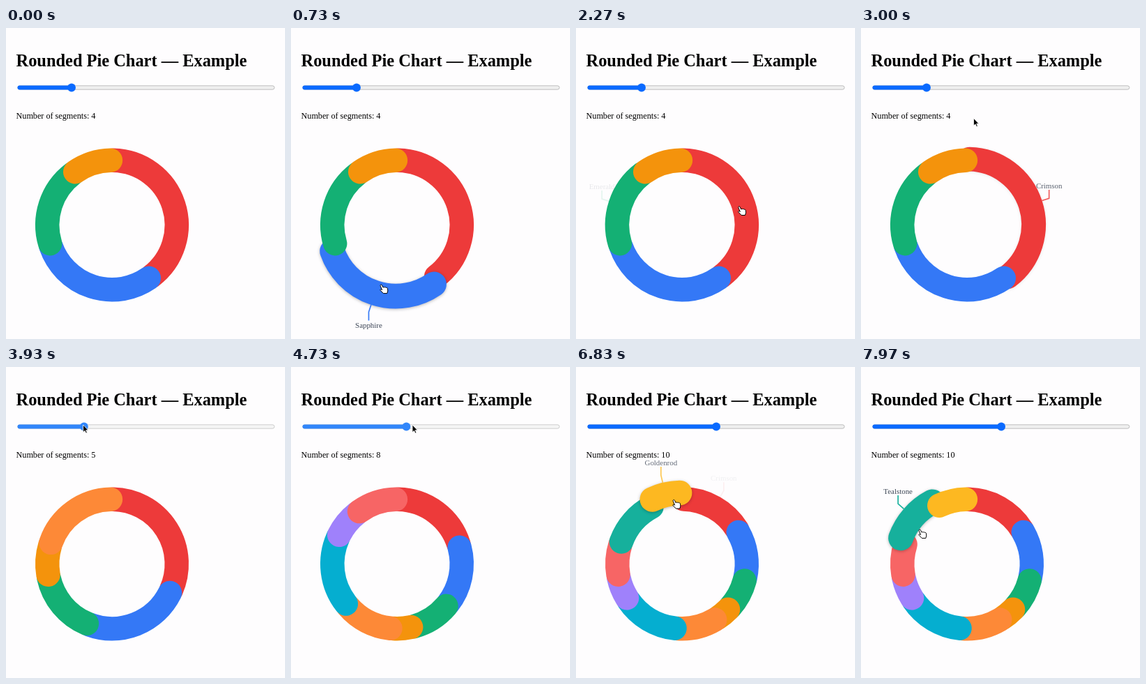
An HTML page for the animation above (8000 ms loop, 400 by 446 pixels).

```html
<!DOCTYPE html>
<html lang="en">
<head>
<meta charset="utf-8">
<title>Rounded Pie Chart</title>
<style>
  html, body { margin: 0; width: 100%; height: 100%; overflow: hidden; background: #fefdfe; }
  svg { display: block; width: 400px; height: 446px; font-family: "Liberation Serif", Times, serif; }
  #chart path { fill: none; stroke-width: 34.5; stroke-linecap: round; }
  #chart .label path { stroke-width: 1.7; stroke-linecap: butt; }
  .label { font-size: 10.9px; text-anchor: middle; fill: #374151; }
</style>
</head>
<body>
<svg viewBox="0 0 400 446">
  <text x="14.5" y="55" font-size="24.42" font-weight="bold">Rounded Pie Chart — Example</text>
  <g id="slider"></g>
  <text id="count" x="14.5" y="130" font-size="12.18"></text>
  <g id="chart"></g>
  <path id="cursor" stroke-linejoin="round"></path>
</svg>
<script>
const LOOP = 8000, STEP = 5;
const CX = 152, CY = 282.5, INNER = 75.5, OUTER = 110;
const MID = (INNER + OUTER) / 2;
const GAP = 1.3;                      // degrees trimmed from both ends of a segment
const GROW = 0.04, SHIFT = 6.1;       // how a hovered segment is lifted
const HOVER_LAG = 50, LIFT_TIME = 80, FADE_TIME = 350;
const DRAG_START = 3600, DRAG_END = 5250;

const segments = [
  [40, '#ed3a3a', 'Crimson'], [30, '#3478f6', 'Sapphire'],
  [20, '#14b074', 'Emerald'], [10, '#f4930c', 'Amber'],
  [25, '#fd8937', 'Tangerine'], [35, '#05aed0', 'Cyan'],
  [15, '#9f81fb', 'Violet'], [20, '#f76565', 'Coral'],
  [30, '#16b09c', 'Tealstone'], [18, '#fdb821', 'Goldenrod']
];

// Stops of the pointer: time, x, y
const stops = [
  [30, 140, 250], [450, 128, 368], [900, 128, 368], [1430, 105, 295],
  [1530, 66.5, 274.5], [1850, 62, 268], [2350, 245, 255], [2750, 235, 225],
  [3000, 161.5, 129.5], [3400, 94, 83], [DRAG_START, 94, 83], [4730, 174, 83],
  [DRAG_END, 203, 84], [6070, 217.5, 165], [6350, 190, 190], [6640, 139, 190.5],
  [7300, 139, 190.5], [7540, 148, 228], [7640, 83, 233]
];

const ARROW = 'M0 0V10.6L2.5 8.4 4.1 12 5.8 11.3 4.2 7.7H7.4Z';
const HAND = 'M.3.6C.9-.3 2-.2 2.4.8L4 4.2C4.6 3.4 5.8 3.3 6.3 4.1 7 3.4 8 3.6 8.4 4.4 ' +
  '9.4 4 10.4 4.6 10.5 5.8L10.8 9 9.8 12.6H4.4L.3 8.4C-.6 7.2.6 6.2 1.7 7L2.6 7.6.3 2.2C0 1.6 0 1 .3.6Z';

const $ = id => document.getElementById(id);
const clamp = (v, low, high) => Math.max(low, Math.min(high, v));
const smooth = p => p * p * (3 - 2 * p);
const setAttributes = (node, attrs) => {
  for (const key in attrs) node.setAttribute(key, attrs[key]);
};

function polar(deg, r) {
  const a = deg * Math.PI / 180;
  return [CX + r * Math.sin(a), CY - r * Math.cos(a)];
}

function pointerAt(t) {
  const next = stops.findIndex(stop => stop[0] > t);
  if (next < 1) return stops.at(next).slice(1);
  const [t0, x0, y0] = stops[next - 1], [t1, x1, y1] = stops[next];
  const p = smooth((t - t0) / (t1 - t0));
  return [x0 + (x1 - x0) * p, y0 + (y1 - y0) * p];
}

const thumbX = count => 22.6 + 17.85 * count;

function segmentCount(t) {
  const [x] = pointerAt(clamp(t, DRAG_START, DRAG_END));
  return Math.round((x - thumbX(0)) / 17.85);
}

function layout(count) {
  const shown = segments.slice(0, count);
  const total = shown.reduce((sum, [value]) => sum + value, 0);
  let from = 0;
  return shown.map(([value, color, name]) => {
    const to = from + value / total * 360;
    const arc = { from, to, middle: (from + to) / 2, color, name };
    from = to;
    return arc;
  });
}

// Index of the segment below the pointer, or -1
function segmentUnder(t) {
  const [x, y] = pointerAt(t);
  const r = Math.hypot(x - CX, y - CY);
  if (t < stops[0][0] || r < INNER || r > OUTER) return -1;
  const angle = (Math.atan2(x - CX, CY - y) * 180 / Math.PI + 360) % 360;
  return layout(segmentCount(t)).findIndex(arc => angle < arc.to);
}

// Hover transitions can be interrupted, so they are worked out once for the whole loop
function hoverTimeline() {
  let state = segments.map(() => ({ lift: 0, fade: 0 }));
  return Array.from({ length: LOOP / STEP }, (_, n) => {
    const hovered = segmentUnder(n * STEP - HOVER_LAG);
    state = state.map(({ lift, fade }, i) => ({
      lift: lift + ((i === hovered) - lift) * STEP / LIFT_TIME,
      fade: clamp(fade + (i === hovered ? 1 : -1) * STEP / FADE_TIME, 0, 1)
    }));
    return state;
  });
}
const timeline = hoverTimeline();

function sliderMarkup(t, count) {
  const x = thumbX(count), near = 220;
  let [fill, track, border] = ['#0a6aff', '#efefef', '#b2b2b2'];
  if (t > DRAG_START && t < DRAG_END + near) [fill, track, border] = ['#3186fa', '#f5f5f5', '#c3c3c3'];
  else if (t > DRAG_START - near && t <= DRAG_START) [fill, track, border] = ['#0b55cc', '#e5e5e5', '#9f9f9f'];
  return `<rect x="16.8" y="82.8" width="368" height="5.4" rx="2.7" fill="${track}" stroke="${border}" stroke-width=".8"/>
    <rect x="16.5" y="82.5" width="${x - 16.5}" height="6" rx="3" fill="${fill}"/>
    <circle cx="${x}" cy="85.5" r="5.9" fill="${fill}"/>`;
}

function arcMarkup({ from, to, middle, color }, lift) {
  const start = polar(from + GAP, MID), end = polar(to - GAP, MID);
  const shadow = lift > 0.02
    ? `style="filter:drop-shadow(0 1.5px 2px rgba(0,0,0,${0.28 * lift}))"` : '';
  return `<path d="M${start}A${MID} ${MID} 0 ${+(to - from > 180)} 1 ${end}" stroke="${color}" ${shadow}
    transform="translate(${polar(middle, SHIFT * lift)}) scale(${1 + GROW * lift}) translate(${-CX} ${-CY})"/>`;
}

function labelMarkup({ middle, color, name }, lift, opacity) {
  const lifted = r => r * (1 + GROW * lift) + SHIFT * lift;
  const [x, y] = polar(middle, lifted(OUTER + 10.5));
  const below = y > CY;
  const end = y + (below ? 12.2 : -12.2);
  return `<g class="label" opacity="${opacity}">
    <path d="M${polar(middle, lifted(OUTER))}L${x} ${y}V${end}" stroke="${color}"/>
    <text x="${x}" y="${end + (below ? 10 : -2)}">${name}</text></g>`;
}

function chartMarkup(t, count) {
  const state = timeline[Math.floor(t / STEP)];
  const arcs = layout(count);
  const labels = arcs.map((arc, i) =>
    state[i].fade ? labelMarkup(arc, state[i].lift, smooth(state[i].fade)) : '');
  return arcs.map((arc, i) => arcMarkup(arc, state[i].lift)).concat(labels).join('');
}

function drawCursor(t) {
  const hand = segmentUnder(t) >= 0;
  setAttributes($('cursor'), {
    d: hand ? HAND : ARROW,
    fill: hand ? '#fff' : '#000',
    stroke: hand ? '#000' : '#fff',
    'stroke-width': hand ? 1 : 0.8,
    transform: `translate(${pointerAt(t)})`,
    visibility: t < stops[0][0] ? 'hidden' : 'visible'
  });
}

function draw(t) {
  const count = segmentCount(t);
  $('count').textContent = `Number of segments: ${count}`;
  $('slider').innerHTML = sliderMarkup(t, count);
  $('chart').innerHTML = chartMarkup(t, count);
  drawCursor(t);
}

const begin = performance.now();
function tick() {
  draw((performance.now() - begin) % LOOP);
  requestAnimationFrame(tick);
}
tick();
</script>
</body>
</html>
```
